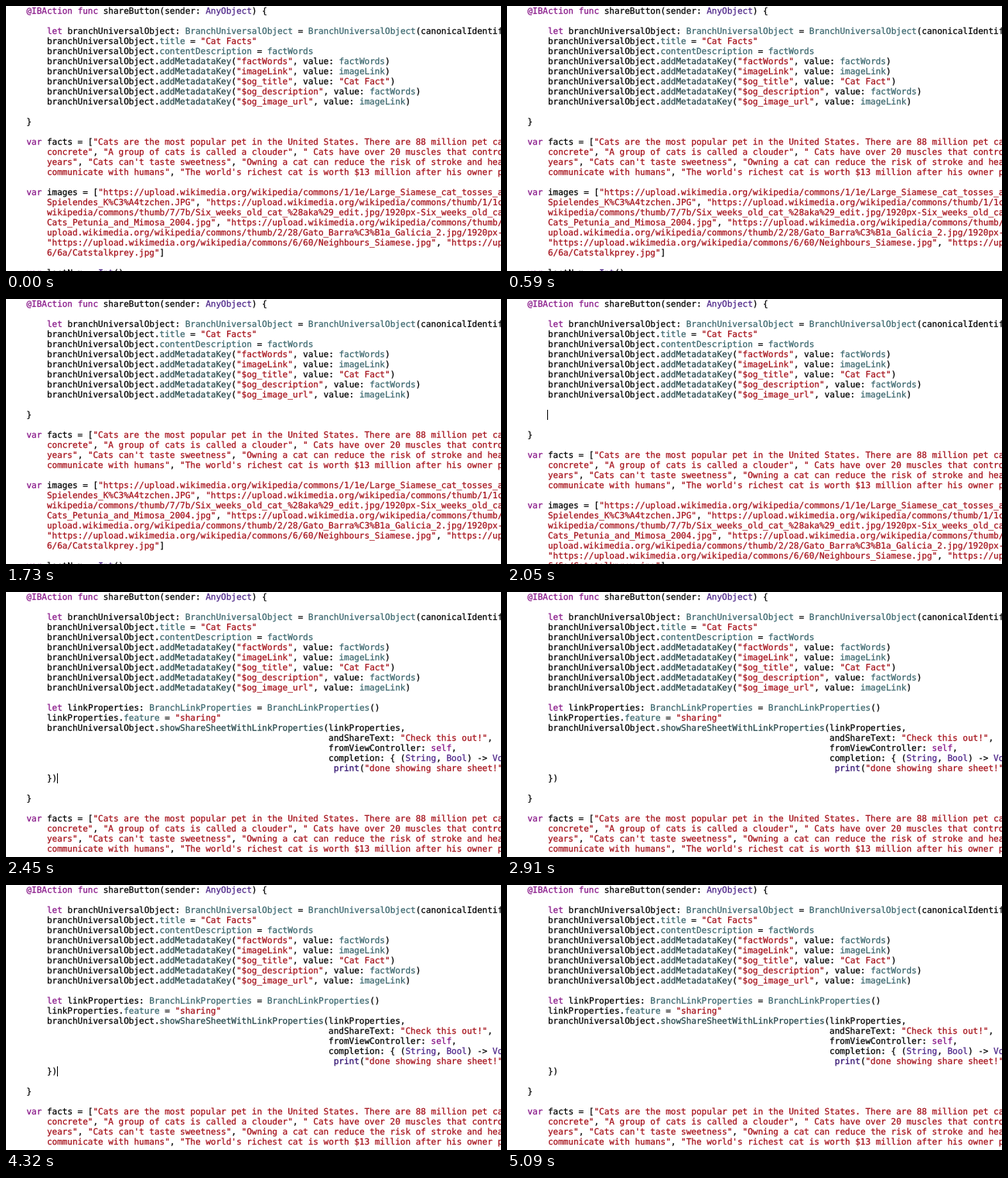
An HTML page that plays this animation: 640 px wide and 342 px high, repeating every 5.13 s.

```html
<!DOCTYPE html>
<html lang="en">
<head>
<meta charset="utf-8">
<title>Share button code</title>
<style>
  :root { --row: 13px; --loop: 5130ms; }
  html, body { margin: 0; width: 100%; height: 100%; overflow: hidden; background: #fff; }
  #stage { position: relative; width: 640px; height: 342px; overflow: hidden; background: #fff; }
  pre {
    position: absolute; left: 26.4px; top: 0; margin: 0; color: #000;
    font: 11px/var(--row) "DejaVu Sans Mono", Menlo, monospace;
    text-rendering: geometricPrecision;
    font-variant-ligatures: none;
    -webkit-text-stroke: 0.25px;
  }
  #snippet, #tail { top: calc(11 * var(--row)); }
  #snippet { animation: paste var(--loop) step-end infinite; }
  #tail { animation: push var(--loop) step-end infinite; }
  #caret {
    position: absolute; left: 52px; top: 0; width: 1px; height: var(--row); background: #000;
    animation: caret var(--loop) step-end infinite;
  }

  .string { color: #a5101a; }
  .keyword { color: #861487; }
  .type { color: #4b2387; }
  .call { color: #2e0d6e; }
  .method { color: #26474b; }
  .member { color: #3a666d; }

  @keyframes push {
    0% { transform: none; }
    36.26% { transform: translateY(var(--row)); }
    38.79% { transform: translateY(calc(2 * var(--row))); }
    44.25%, 100% { transform: translateY(calc(9 * var(--row))); }
  }
  @keyframes paste {
    0% { opacity: 0; }
    44.25%, 100% { opacity: 1; }
  }
  /* two returns, the paste, then a half-second blink */
  @keyframes caret {
    0% { opacity: 0; transform: none; }
    36.26% { opacity: 1; transform: translateY(calc(10 * var(--row))); }
    38.79% { opacity: 1; transform: translateY(calc(11 * var(--row))); }
    44.25%, 63.74%, 83.24% { opacity: 1; transform: translate(14px, calc(18 * var(--row))); }
    54%, 73.49%, 92.98%, 100% { opacity: 0; transform: translate(14px, calc(18 * var(--row))); }
  }
</style>
</head>
<body>
<div id="stage">
<pre>
@IBAction func shareButton(sender: AnyObject) {

    let branchUniversalObject: BranchUniversalObject = BranchUniversalObject(canonicalIdentifier:
    branchUniversalObject.title = "Cat Facts"
    branchUniversalObject.contentDescription = factWords
    branchUniversalObject.addMetadataKey("factWords", value: factWords)
    branchUniversalObject.addMetadataKey("imageLink", value: imageLink)
    branchUniversalObject.addMetadataKey("$og_title", value: "Cat Fact")
    branchUniversalObject.addMetadataKey("$og_description", value: factWords)
    branchUniversalObject.addMetadataKey("$og_image_url", value: imageLink)
</pre>
<pre id="snippet">
    let linkProperties: BranchLinkProperties = BranchLinkProperties()
    linkProperties.feature = "sharing"
    branchUniversalObject.showShareSheetWithLinkProperties(linkProperties,
                                                           andShareText: "Check this out!",
                                                           fromViewController: self,
                                                           completion: { (String, Bool) -&gt; Void in
                                                            print("done showing share sheet!")
    })
</pre>
<pre id="tail">
}

var facts = ["Cats are the most popular pet in the United States. There are 88 million pet cats
    concrete", "A group of cats is called a clouder", " Cats have over 20 muscles that control
    years", "Cats can't taste sweetness", "Owning a cat can reduce the risk of stroke and heart
    communicate with humans", "The world's richest cat is worth $13 million after his owner passed"]

var images = ["https://upload.wikimedia.org/wikipedia/commons/1/1e/Large_Siamese_cat_tosses_a_
    Spielendes_K%C3%A4tzchen.JPG", "https://upload.wikimedia.org/wikipedia/commons/thumb/1/1c/
    wikipedia/commons/thumb/7/7b/Six_weeks_old_cat_%28aka%29_edit.jpg/1920px-Six_weeks_old_cat
    Cats_Petunia_and_Mimosa_2004.jpg", "https://upload.wikimedia.org/wikipedia/commons/thumb/
    upload.wikimedia.org/wikipedia/commons/thumb/2/28/Gato_Barra%C3%B1a_Galicia_2.jpg/1920px-Gato.jpg",
    "https://upload.wikimedia.org/wikipedia/commons/6/60/Neighbours_Siamese.jpg", "https://upload.
    6/6a/Catstalkprey.jpg"]

var lastNum = Int()
</pre>
<div id="caret"></div>
</div>
<script>
  const tokens = new RegExp([
    '(?<string>"[^"]*")',
    '(?<keyword>@IBAction|\\b(?:func|let|var|self)\\b)',
    '(?<type>\\b(?:AnyObject|Int|String|Bool|Void)\\b)',
    '(?<call>\\bprint\\b)',
    '(?<method>\\b(?:addMetadataKey|showShareSheetWithLinkProperties)\\b)',
    '(?<member>\\b(?:Branch\\w+|title|contentDescription|feature|factWords|imageLink)\\b)'
  ].join('|'), 'g');

  function paint(text, ...rest) {
    const groups = rest.at(-1);
    const kind = Object.keys(groups).find(key => groups[key]);
    return `<span class="${kind}">${text}</span>`;
  }

  for (const block of document.querySelectorAll('pre')) {
    block.innerHTML = block.textContent.replace(tokens, paint);
  }
</script>
</body>
</html>
```
